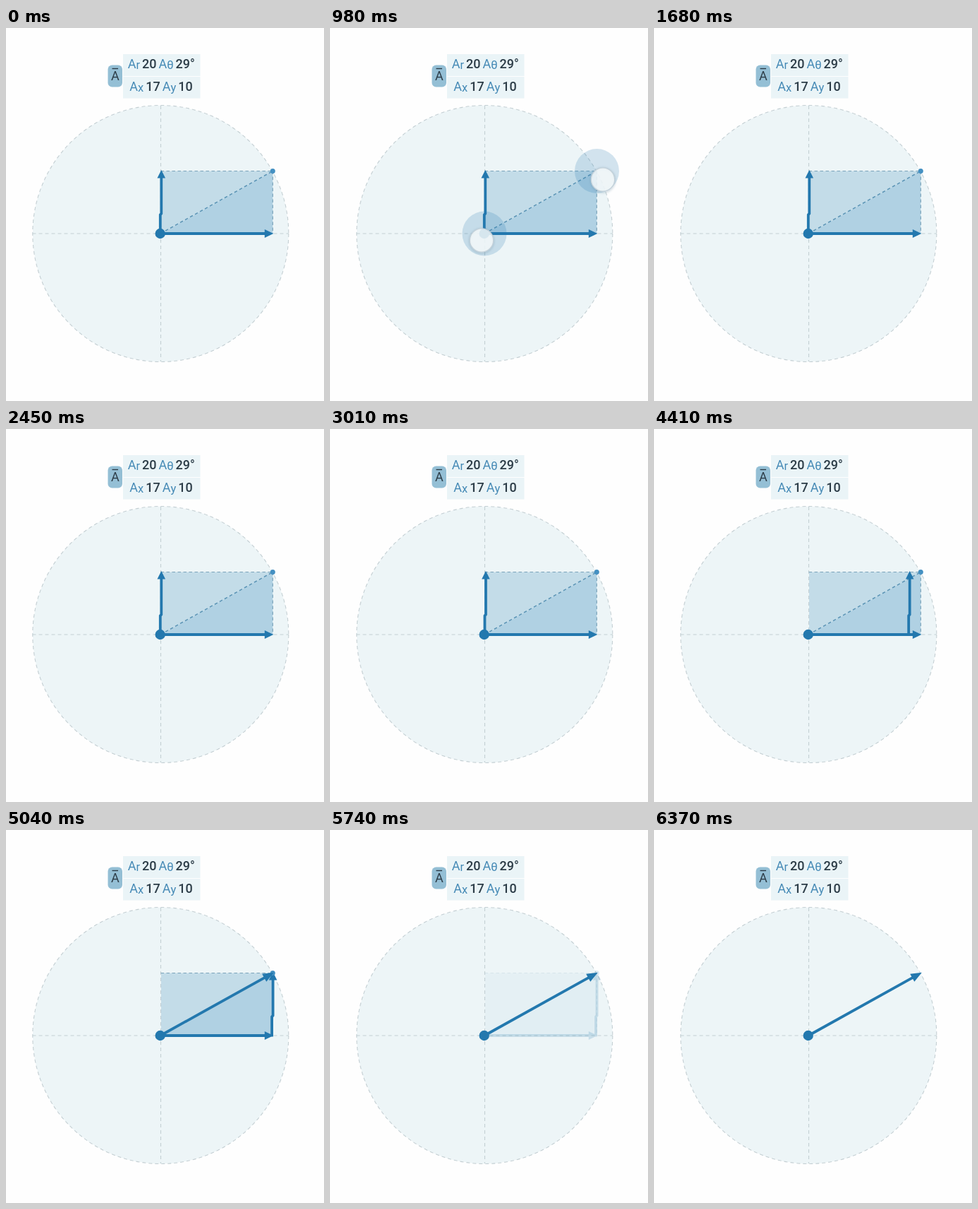
These frames come from a looping animation (451x528 px, 6440 ms). An HTML page:

```html
<!DOCTYPE html>
<html lang="en">
<head>
<meta charset="utf-8">
<title>Vector components</title>
<style>
html, body { margin: 0; width: 100%; height: 100%; overflow: hidden; background: #fefefe; }
svg { display: block; width: 100vw; height: 100vh; }
text { font-family: Roboto, sans-serif; font-size: 18px; font-weight: 500; word-spacing: -1.5px; fill: #2c3c47; text-anchor: middle; }
.name { fill: #4489b5; font-weight: 400; }
.sub { font-size: 16.5px; }
.axis { fill: none; stroke: #c4cfd3; stroke-width: 1.1; stroke-dasharray: 5 4; }
.edge { fill: none; stroke: #7aa3ba; stroke-width: 1.2; stroke-dasharray: 4.5 3.5; }
.shaft { fill: none; stroke: #2378ae; stroke-width: 3.8; }
.head, .dot { fill: #2378ae; }
.disc { fill: #f4f8fa; fill-opacity: .86; stroke: #c3d1da; stroke-width: 1.3; }
</style>
</head>
<body>
<svg viewBox="0 0 451 528">
  <defs>
    <filter id="soft" x="-50%" y="-50%" width="200%" height="200%">
      <feGaussianBlur stdDeviation="1.5"/>
    </filter>
  </defs>

  <rect x="166" y="37" width="109.5" height="31" fill="#eaf4f7"/>
  <rect x="166" y="69" width="109.5" height="30.5" fill="#eaf4f7"/>
  <rect x="144.5" y="52.5" width="20.5" height="31" rx="6" fill="#94bfd5"/>
  <text x="154.8" y="73.5" style="font-weight:400">A</text>
  <path d="M150.5 57.5h8.5" stroke="#2c3c47" stroke-width="1.4"/>
  <text x="220.3" y="57"><tspan class="name">A<tspan class="sub" dy=".5">r</tspan></tspan><tspan dy="-.5"> 20 </tspan><tspan class="name">A<tspan class="sub" dy=".5">θ</tspan></tspan><tspan dy="-.5"> 29°</tspan></text>
  <text x="220" y="89.3"><tspan class="name">A<tspan class="sub" dy=".5">x</tspan></tspan><tspan dy="-.5"> 17 </tspan><tspan class="name">A<tspan class="sub" dy=".5">y</tspan></tspan><tspan dy="-.5"> 10</tspan></text>

  <circle cx="219.3" cy="291" r="181.5" fill="#edf5f7"/>
  <circle class="axis" cx="219.3" cy="291" r="181.5"/>
  <path class="axis" d="M37.5 291H401M219.5 110V472"/>

  <g id="parts">
    <path d="M220 291V202.5H378.3Z" fill="#c3dce8"/>
    <path d="M220 291H378.3V202.5Z" fill="#b0d1e3"/>
    <path class="edge" d="M219.5 202.5H378.3M378.3 202.5V291"/>
    <path id="diagonal" class="edge" d="M219 291L378.3 202.5" style="stroke:#5b94b5;stroke-width:1.5"/>
  </g>
  <g id="halos" fill="#2378ae" fill-opacity=".2"></g>
  <g id="arms">
    <path class="shaft" d="M219 291H368"/>
    <path class="head" d="M379.3 291l-12.5-6v12z"/>
    <g id="rise">
      <path class="shaft" d="M-.7 292.5V264.5L.8 262.5V211"/>
      <path class="head" d="M.8 201l-5.8 11.5h11.6z"/>
    </g>
    <circle id="tip" cx="378.3" cy="202.5" r="3.5" fill="#4490c2"/>
  </g>
  <g id="sum">
    <path class="shaft" d="M219 291L367 208.8"/>
    <path class="head" d="M0 0l-15.5-6.3v12.6z" transform="translate(379.8 201.8) rotate(-29)"/>
  </g>
  <circle class="dot" cx="218.7" cy="291" r="7.2"/>
  <g id="discs"></g>
</svg>
<script>
const LOOP = 6440;
const $ = id => document.getElementById(id);
const touches = [
  { x: 219, y: 291, dx: 215, dy: 300.5 },
  { x: 378.5, y: 202.5, dx: 387, dy: 214.5 }
];

$('halos').innerHTML = touches.map(p => `<circle cx="${p.x}" cy="${p.y}" r="31.5"/>`).join('');
$('discs').innerHTML = touches.map(p =>
  `<circle cx="${p.dx}" cy="${p.dy + 1}" r="17" fill="none" stroke="#6e8fa3" stroke-opacity=".4" stroke-width="2" filter="url(#soft)"/>` +
  `<circle class="disc" cx="${p.dx}" cy="${p.dy}" r="16.7"/>`).join('');
const halos = [...$('halos').children];

const ramp = (t, a, b) => Math.min(1, Math.max(0, (t - a) / (b - a)));
const smooth = u => u * u * (3 - 2 * u);
const cubic = u => u < .5 ? 4 * u ** 3 : 1 - 4 * (1 - u) ** 3;
const fade = (id, v) => $(id).setAttribute('opacity', v.toFixed(3));

function draw(t) {
  const press = smooth(ramp(t, 350, 630)) * (1 - smooth(ramp(t, 1120, 1470)));
  fade('halos', press);
  fade('discs', press);
  fade('tip', 1 - press);
  halos.forEach(h => h.setAttribute('r', 20 + 11.5 * press));

  const x = 219.5 + 158.3 * cubic(ramp(t, 2775, 5089));
  $('rise').setAttribute('transform', `translate(${x.toFixed(2)} 0)`);

  const joined = smooth(ramp(t, 4760, 5010));
  fade('sum', joined);
  fade('diagonal', 1 - joined);

  const rest = 1 - smooth(ramp(t, 5180, 5950));
  fade('parts', rest);
  fade('arms', rest);
}

const start = performance.now();
function tick() {
  draw((performance.now() - start) % LOOP);
  requestAnimationFrame(tick);
}
tick();
</script>
</body>
</html>
```
